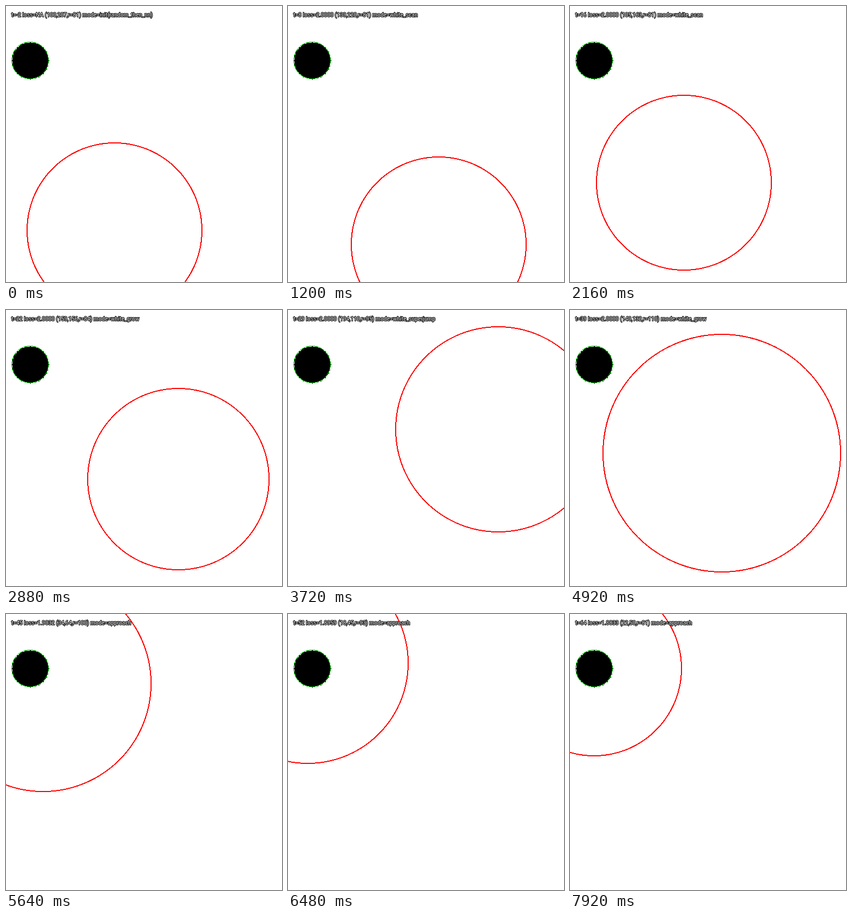
An HTML page with a canvas that plays this animation: 510x510 px, repeating every 8 s.

```html
<!DOCTYPE html>
<html lang="en">
<head>
<meta charset="utf-8">
<title>Circle search</title>
<style>
  html, body { margin: 0; width: 100%; height: 100%; overflow: hidden; background: #fff; }
  canvas { display: block; }
</style>
</head>
<body>
<canvas id="stage" width="510" height="510"></canvas>
<script>
const ctx = document.getElementById('stage').getContext('2d');
const LOOP = 8000, STEP = 120, SCALE = 2;
const FOUND = 41; // last step before the approach
const goal = { x: 22, y: 50, r: 17 };

// Turning points of the search
const turns = [
  { at: 0, x: 100, y: 207 },
  { at: 10, x: 139, y: 220 },
  { at: 18, x: 105, y: 163 },
  { at: 21, x: 144, y: 176 },
  { at: 31, x: 194, y: 110 },
  { at: FOUND, x: 140, y: 132 }
];

function wander(step) {
  const i = Math.max(1, turns.findIndex(p => p.at >= step));
  const a = turns[i - 1], b = turns[i];
  const k = (step - a.at) / (b.at - a.at);
  return { x: a.x + (b.x - a.x) * k, y: a.y + (b.y - a.y) * k, r: 81 + 1.5 * Math.max(0, step - 21.7) };
}

// Damped swing onto the goal while the radius shrinks
function approach(step) {
  const u = step - FOUND;
  const swing = Math.exp(-0.24 * u) * Math.cos(0.19 * u);
  return { x: goal.x + 118 * swing, y: goal.y + 140 * swing, r: 147 - step };
}

function circleAt(step) {
  const { x, y, r } = step > FOUND ? approach(step) : wander(step);
  return { x: Math.round(x), y: Math.round(y), r: Math.round(r) };
}

function modeAt(t) {
  if (t < 0) return 'init(random_then_nn)';
  if (t < 20) return 'white_scan';
  if (t === 29) return 'white_superjump';
  return t < FOUND ? 'white_grow' : 'approach';
}

// Ring of whole pixels, its width growing inwards
function ring(c, width, color) {
  const cx = c.x * SCALE, cy = c.y * SCALE, r = c.r * SCALE;
  const outer = r + 0.5, inner = outer - width;
  ctx.fillStyle = color;
  for (let dy = -r; dy <= r; dy++) {
    const far = Math.floor(Math.sqrt(outer * outer - dy * dy));
    const near = Math.ceil(Math.sqrt(Math.max(0, inner * inner - dy * dy)));
    const w = Math.max(0, far - near + 1);
    ctx.fillRect(cx + near, cy + dy, w, 1);
    ctx.fillRect(cx - far, cy + dy, w, 1);
  }
}

// Disc of square cells
function disc(c) {
  ctx.fillStyle = '#000';
  for (let dy = -c.r; dy <= c.r; dy++) {
    const half = Math.floor(Math.sqrt(c.r * c.r - dy * dy));
    ctx.fillRect((c.x - half) * SCALE, (c.y + dy) * SCALE, (2 * half + 1) * SCALE, SCALE);
  }
}

function label(text) {
  ctx.font = '10.35px Roboto, Arial, sans-serif';
  ctx.lineJoin = 'round';
  ctx.lineWidth = 2;
  ctx.strokeStyle = '#000';
  ctx.fillStyle = '#fff';
  ctx.strokeText(text, 10, 20);
  ctx.fillText(text, 10, 20);
}

function draw(now) {
  const step = Math.floor((now % LOOP) / STEP);
  const t = step - 2, mode = modeAt(t), c = circleAt(step);
  const loss = t < 0 ? 'NA'
    : (mode === 'approach' ? 1.8833 + 0.00105 * (c.r - 81) : 2).toFixed(4);

  ctx.fillStyle = '#fff';
  ctx.fillRect(0, 0, 510, 510);
  disc(goal);
  ring(goal, 1, '#00c800');
  ring(c, 2, '#f00');
  label(`t=${t} loss=${loss} (${c.x},${c.y},r=${c.r}) mode=${mode}`);
}

let start;
function tick(now) {
  start ??= now;
  draw(now - start);
  requestAnimationFrame(tick);
}
draw(0);
requestAnimationFrame(tick);
</script>
</body>
</html>
```
